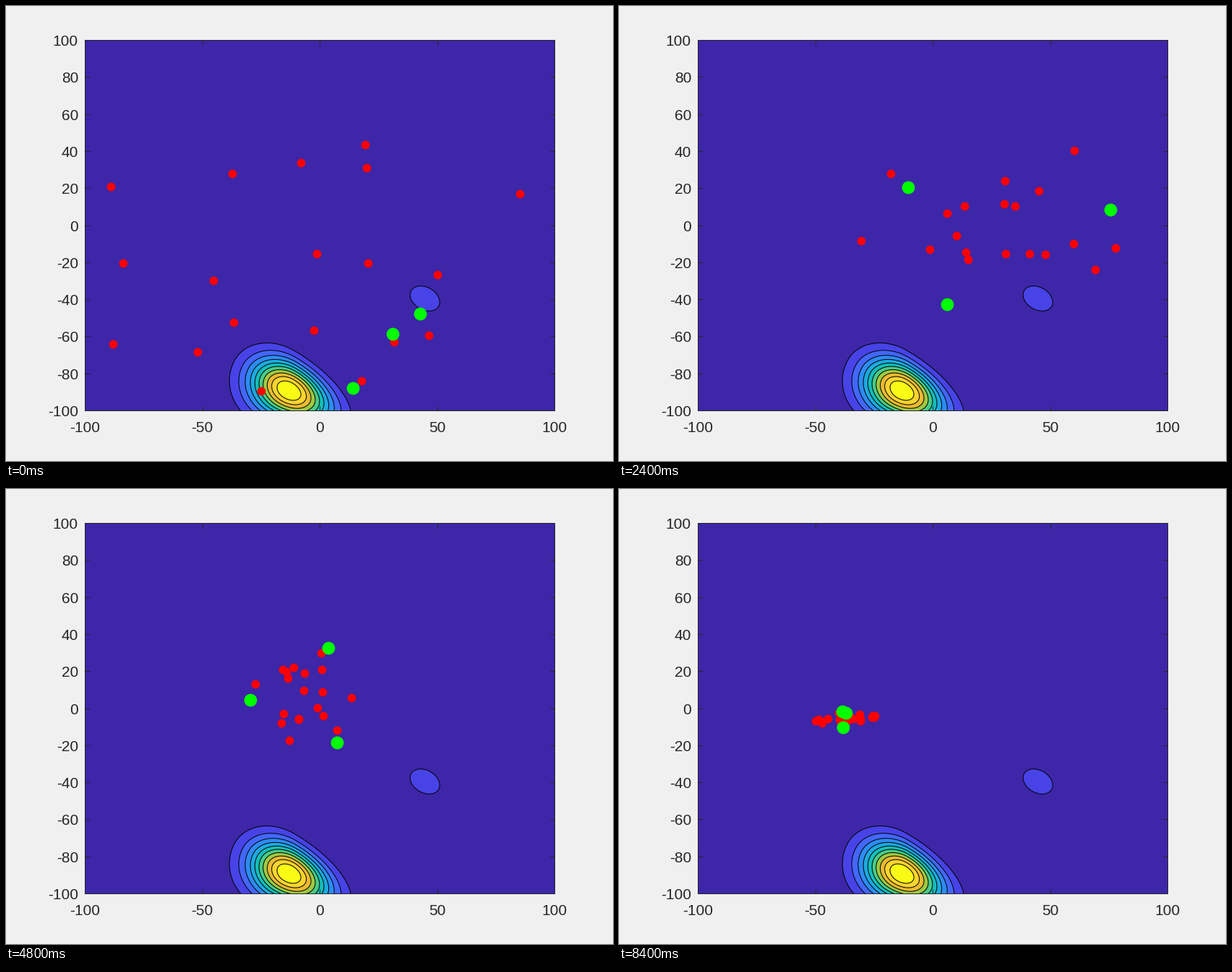
A matplotlib script for the animation above (8700 ms loop, 840 by 630 pixels).

```python
import numpy as np
import matplotlib.pyplot as plt
from matplotlib.animation import FuncAnimation
from matplotlib.patches import Rectangle

W, H, DPI = 840, 630, 100
PX = 72 / DPI                                  # one pixel in points
LEFT, RIGHT, TOP, BOTTOM = 109, 759, 47, 560
INK = "#262626"
FRAMES, STEP = 29, 300
PACK, LIMIT = 19, 94

PARULA = ["#3E26A8", "#4743E7", "#4367FD", "#2D8CF3", "#1CAADF", "#12BEB9",
          "#48CB86", "#9FC942", "#EABA31", "#FAD42E", "#F9FB15"]

plt.rcParams["font.family"] = "Liberation Sans"
fig = plt.figure(figsize=(W / DPI, H / DPI), dpi=DPI, facecolor="#F0F0F0")
ax = fig.add_axes([0, 0, 1, 1])
ax.set_xlim(0, W)
ax.set_ylim(H, 0)
ax.axis("off")


def to_px(p):
    """Plot units (-100..100) to stage pixels."""
    p = np.asarray(p, float)
    x = LEFT + (p[..., 0] + 100) * (RIGHT - LEFT) / 200
    y = BOTTOM - (p[..., 1] + 100) * (BOTTOM - TOP) / 200
    return np.stack([x, y], -1)


# ---- contour map -------------------------------------------------------

T = np.linspace(0, 2 * np.pi, 361)
TILT = np.radians(30)


def draw_ring(center, u, v, color):
    """Closed ring, u along the axis that falls to the right, v across it."""
    x = center[0] + u * np.cos(TILT) + v * np.sin(TILT)
    y = center[1] + u * np.sin(TILT) - v * np.cos(TILT)
    ring, = ax.fill(x, y, fc=color, ec="black", lw=PX, zorder=2)
    ring.set_clip_path(frame)


def egg(size):
    """Ellipse near the summit, more egg-shaped the wider the ring."""
    c, s = np.cos(T), np.sin(T)
    u = -22 * size + c * np.where(c > 0, 89 + 29 * size, 89 - 25 * size)
    v = s * np.where(s > 0, 58.7 - 7.2 * size, 58.7 + 2.3 * size)
    return size * u, size * v


frame = Rectangle((LEFT, TOP), RIGHT - LEFT, BOTTOM - TOP,
                  fc=PARULA[0], ec="none", zorder=1)
ax.add_patch(frame)
for level in range(1, 11):
    size = np.sqrt(np.log(11 / level) / np.log(11))
    draw_ring((391.5, 532.5), *egg(size), PARULA[level])
draw_ring((579.7, 405), 21.9 * np.cos(T), 15.5 * np.sin(T), PARULA[1])


# ---- axes --------------------------------------------------------------

def stroke(xs, ys):
    ax.plot(xs, ys, color=INK, lw=PX, zorder=3, solid_capstyle="butt")


def label(x, y, text, ha):
    ax.text(x, y, text, size=20.83 * PX, color=INK, ha=ha, va="baseline")


ax.add_patch(Rectangle((LEFT, TOP), RIGHT - LEFT, BOTTOM - TOP,
                       fc="none", ec=INK, lw=PX, zorder=3))
for v in range(-100, 101, 50):
    x = to_px((v, 0))[0]
    stroke([x, x], [BOTTOM, BOTTOM - 6.5])
    stroke([x, x], [TOP, TOP + 6.5])
    label(x, 590, str(v), "center")
for v in range(-100, 101, 20):
    y = to_px((0, v))[1]
    stroke([LEFT, LEFT + 6.5], [y, y])
    stroke([RIGHT, RIGHT - 6.5], [y, y])
    label(100, y + 8, str(v), "right")


# ---- wolf pack ---------------------------------------------------------

# Where the three leaders stand at key steps, in plot units
LEADERS = {
    0: [(14.3, -88), (31, -58.8), (42.7, -47.7)],
    5: [(-3.7, -43), (6.3, -42.6), (75.7, 8.5)],
    11: [(-10.5, 20.6), (-9.1, 18.1), (7.3, -18.4)],
    16: [(3.8, 32.5), (-29.6, 4.4), (7.3, -18.4)],
    21: [(-2.4, 33.6), (-36.7, -1.6), (-36.8, -1.4)],
    24: [(-39, -2.7), (-37.6, -2.5), (-36.5, -1.4)],
    28: [(-38.5, -1.6), (-37, -2.7), (-38.2, -10.3)],
}


def leaders_at(k):
    """Leaders hold their place, then give way one after another."""
    p = max(s for s in LEADERS if s <= k)
    q = min(s for s in LEADERS if s >= k)
    changed = (k - p) > (q - p) * np.arange(1, 4) / 4
    return np.where(changed[:, None], LEADERS[q], LEADERS[p])


def hunt(wolves, leaders, a, rng):
    """One grey wolf step: the first of several tries that stays in bounds."""
    shape = (30, 3) + wolves.shape
    A, C = rng.uniform(-a, a, shape), rng.uniform(0, 2, shape)
    prey = leaders[:, None]
    tries = (prey - A * np.abs(C * prey - wolves)).mean(1)
    first = (np.abs(tries) < LIMIT).all(-1).argmax(0)
    return tries[first, np.arange(len(wolves))]


def build_states():
    rng = np.random.default_rng(7)
    wolves = rng.uniform((-90, -90), (86, 45), (PACK, 2))
    states = []
    for k in range(FRAMES):
        leaders = leaders_at(k)
        if k:
            wolves = hunt(wolves, leaders, 2 - 0.03 * k, rng)
        states.append((to_px(leaders), to_px(wolves)))
    return states


def dots(color, diameter, z):
    return ax.scatter([], [], s=(diameter * PX) ** 2, c=color, lw=0, zorder=z)


states = build_states()
red = dots("#FF0000", 11.8, 4)
green = dots("#00FF00", 17.8, 5)


def draw(k):
    leaders, wolves = states[k]
    red.set_offsets(wolves)
    green.set_offsets(leaders)
    return red, green


anim = FuncAnimation(fig, draw, frames=FRAMES, interval=STEP, repeat=True)
plt.show()
```
